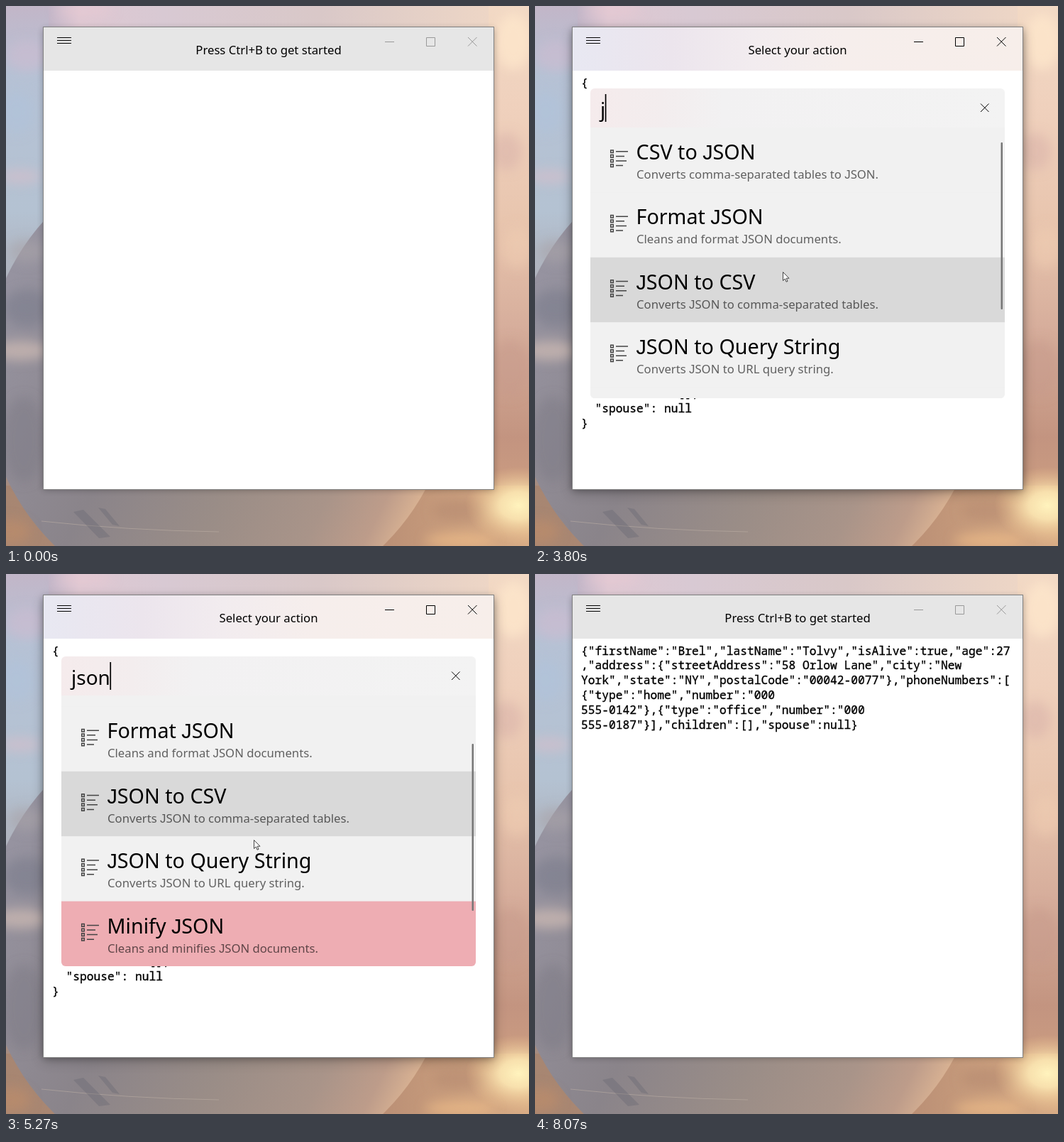
Recreate the animation shown at these times as an HTML page. Size 737x760 px, loop 8.19 s.

```html
<!DOCTYPE html>
<html lang="en">
<head>
<meta charset="utf-8">
<title>Editor command palette</title>
<style>
  html, body { margin: 0; width: 100%; height: 100%; overflow: hidden; }
  svg { display: block; width: 737px; height: 760px; }
  text { font-family: "Noto Sans", sans-serif; white-space: pre; }
  .ui { font-size: 16.7px; }
  .desc { font-size: 16.7px; fill: rgba(0, 0, 0, .6); }
  .name { font-size: 28.7px; }
  .query { font-size: 28px; }
  .code { font-family: "Noto Sans Mono", monospace; font-size: 16.25px; stroke: #000; stroke-width: .35px; }
  .cap { font-family: "Liberation Sans", sans-serif; }
  .line { fill: none; stroke: #000; stroke-width: 1; }
</style>
</head>
<body>
<svg viewBox="0 0 737 760" xmlns="http://www.w3.org/2000/svg">
  <defs>
    <linearGradient id="top">
      <stop offset=".08" stop-color="#c2b6c8"/><stop offset=".14" stop-color="#dec8d2"/>
      <stop offset=".3" stop-color="#d8c9d3"/><stop offset=".6" stop-color="#d9c8c8"/>
      <stop offset="1" stop-color="#f2d9c5"/>
    </linearGradient>
    <linearGradient id="left" x2="0" y2="1">
      <stop offset="0" stop-color="#c2b6c8"/><stop offset=".13" stop-color="#b6c2d5"/>
      <stop offset=".38" stop-color="#b4c2d2"/><stop offset=".7" stop-color="#a79a9c"/>
      <stop offset="1" stop-color="#a78672"/>
    </linearGradient>
    <linearGradient id="right" x2="0" y2="1">
      <stop offset="0" stop-color="#f2d9c5"/><stop offset=".2" stop-color="#efd0bc"/>
      <stop offset=".4" stop-color="#e8c5ae"/><stop offset=".6" stop-color="#d6ad9b"/>
      <stop offset=".8" stop-color="#c39480"/><stop offset="1" stop-color="#d3a581"/>
    </linearGradient>
    <linearGradient id="bottom">
      <stop offset="0" stop-color="#a78672"/><stop offset=".7" stop-color="#b88d74"/>
      <stop offset="1" stop-color="#d9ad86"/>
    </linearGradient>
    <linearGradient id="planet" gradientUnits="userSpaceOnUse" x1="0" y1="400" x2="600" y2="700">
      <stop offset="0" stop-color="#9693a0"/><stop offset=".35" stop-color="#8a848a"/>
      <stop offset=".6" stop-color="#9a8d87"/><stop offset=".8" stop-color="#a99489"/>
      <stop offset=".91" stop-color="#bd9c8a"/><stop offset=".98" stop-color="#dab393"/>
    </linearGradient>
    <radialGradient id="glow">
      <stop offset="0" stop-color="#fff3bd"/><stop offset=".35" stop-color="#fbe6b2" stop-opacity=".9"/>
      <stop offset="1" stop-color="#f0c490" stop-opacity="0"/>
    </radialGradient>
    <linearGradient id="acrylic">
      <stop offset="0" stop-color="#e8e8f2"/><stop offset=".22" stop-color="#ece5ed"/>
      <stop offset=".4" stop-color="#f2ecef"/><stop offset=".6" stop-color="#f6eeec"/>
      <stop offset="1" stop-color="#f7eeea"/>
    </linearGradient>
    <linearGradient id="field" gradientUnits="userSpaceOnUse" x1="78" x2="662">
      <stop offset="0" stop-color="#f5ebec"/><stop offset=".17" stop-color="#f3edee"/>
      <stop offset=".32" stop-color="#f2f1f2"/><stop offset="1" stop-color="#f3f3f3"/>
    </linearGradient>
    <filter id="soft" x="-50%" y="-50%" width="200%" height="200%"><feGaussianBlur stdDeviation="8"/></filter>
    <filter id="shade" x="-10%" y="-10%" width="120%" height="120%"><feGaussianBlur stdDeviation="5"/></filter>
    <filter id="deep" x="-10%" y="-10%" width="120%" height="120%"><feGaussianBlur stdDeviation="9"/></filter>
    <clipPath id="panelClip"><rect x="78" y="116" width="584" height="436" rx="6"/></clipPath>
    <clipPath id="listClip"><rect x="78" y="171" width="584" height="381"/></clipPath>
  </defs>

  <rect width="737" height="760" fill="url(#top)"/>
  <rect width="60" height="760" fill="url(#left)"/>
  <rect x="680" width="57" height="760" fill="url(#right)"/>
  <rect y="675" width="737" height="85" fill="url(#bottom)"/>
  <circle cx="300" cy="523" r="331" fill="url(#planet)"/>
  <g id="clouds" filter="url(#soft)"></g>
  <ellipse cx="722" cy="703" rx="75" ry="55" fill="url(#glow)"/>
  <path d="M50 725Q170 738 300 740" fill="none" stroke="#c3b5aa" opacity=".5"/>
  <path d="M95 712l14-3 38 38-16 2zM130 706l10 2 20 24-10-2z" fill="#65646f" opacity=".35"/>

  <rect id="idleShadow" x="52" y="32" width="636" height="649" filter="url(#shade)" opacity=".28"/>
  <rect id="activeShadow" x="52" y="36" width="636" height="649" filter="url(#deep)" opacity=".25"/>
  <rect x="52" y="29" width="636" height="652" fill="#808080"/>
  <rect x="53" y="30" width="634" height="650" fill="#fff"/>
  <rect x="53" y="30" width="634" height="61" fill="#e6e6e6"/>
  <rect id="titleTint" x="53" y="30" width="634" height="61" fill="url(#acrylic)"/>
  <path class="line" d="M72 44.5h20M72 48.5h20M72 52.5h20"/>
  <path id="controls" class="line" d="M534 50.5h13M592.5 44.5h12v12h-12zM651 44l12.5 12.5M663.5 44L651 56.5"/>
  <text id="title" class="ui" x="370" y="68" text-anchor="middle"></text>

  <g id="pretty"></g>
  <g id="compact"></g>
  <rect id="caret" width="1.7" height="20"/>

  <g id="panel">
    <rect x="78" y="116" width="584" height="55" rx="6" fill="url(#field)"/>
    <g id="results" clip-path="url(#panelClip)">
      <rect x="78" y="160" width="584" height="11" fill="url(#field)"/>
      <g clip-path="url(#listClip)">
        <rect x="78" y="171" width="584" height="381" fill="#f1f1f1"/>
        <g id="items"></g>
        <rect id="thumb" x="656.5" width="2.5" height="235" rx="1" fill="#777"/>
      </g>
      <path class="line" d="M628 137.5l11.5 11.5M639.5 137.5L628 149"/>
    </g>
    <text id="hint" class="query" x="91" y="157" fill="#918c8d">Start typing...</text>
    <text id="query" class="query" x="92" y="156"></text>
    <rect id="queryCaret" y="124" width="1.7" height="39"/>
  </g>

  <path id="arrow" d="M.5.5v12l2.8-2.6 1.8 4.3 1.9-.8-1.8-4.2h3.8z" fill="#fff" stroke="#333" stroke-width=".9"/>
  <path id="beam" class="line" d="M-3.5-6.5h3l.5.5.5-.5h3M0-6v12.5M-3.5 7h3l.5-.5.5.5h3"/>
</svg>

<script>
const LOOP = 8190, STEP = 200 / 3, ROW = 91.4, LINE = 20.83, CHAR = 9.75;
const COLUMNS = 62, TEXT_X = 65, TEXT_Y = 113.5;
const $ = id => document.getElementById(id);

function add(parent, tag, attrs, text) {
  const el = document.createElementNS("http://www.w3.org/2000/svg", tag);
  for (const key in attrs) el.setAttribute(key, attrs[key]);
  if (text) el.textContent = text;
  return parent.appendChild(el);
}
const set = (id, attrs) => { for (const key in attrs) $(id).setAttribute(key, attrs[key]); };
const show = (id, on) => { $(id).style.display = on ? "" : "none"; };
const between = (t, from, to) => t >= from && t < to;

// Value of the last entry [time, value] that has begun.
const at = (table, t) => table.reduce((value, [start, next]) => t >= start ? next : value, table[0][1]);

// Sky and surface patches: x, y, rx, ry, colour, opacity
[
  [110, 6, 40, 10, "#eccad4", .5],
  [30, 70, 30, 22, "#cdbdd0", .6],
  [15, 150, 25, 30, "#b0c4db", .6],
  [20, 240, 30, 10, "#d3bfcb", .7],
  [30, 345, 26, 16, "#a9a3a8", .6],
  [30, 425, 34, 26, "#7b7d8d", .6],
  [20, 485, 40, 14, "#c9b7b2", .8],
  [25, 610, 30, 60, "#7f7b86", .5],
  [5, 740, 30, 18, "#c08e6c", .6],
  [715, 50, 26, 40, "#ffe8cc", .7],
  [705, 205, 22, 26, "#d7b0a7", .5],
  [720, 340, 22, 30, "#f2cfb4", .5],
  [710, 510, 30, 40, "#c59a8c", .5],
  [640, 710, 40, 16, "#b68a70", .6],
  [640, 752, 50, 10, "#eebd88", .7]
].forEach(([cx, cy, rx, ry, fill, opacity]) => add($("clouds"), "ellipse", { cx, cy, rx, ry, fill, opacity }));

const person = {
  firstName: "Brel", lastName: "Tolvy", isAlive: true, age: 27,
  address: { streetAddress: "58 Orlow Lane", city: "New York", state: "NY", postalCode: "00042-0077" },
  phoneNumbers: [
    { type: "home", number: "000 555-0142" },
    { type: "office", number: "000 555-0187" }
  ],
  children: [], spouse: null
};

function wrap(text) {
  const lines = [];
  while (text) {
    const space = text.length > COLUMNS ? text.slice(0, COLUMNS).lastIndexOf(" ") : -1;
    const end = space < 0 ? COLUMNS : space + 1;
    lines.push(text.slice(0, end));
    text = text.slice(end);
  }
  return lines;
}

function typeset(parent, lines) {
  lines.forEach((line, i) => add(parent, "text", { class: "code", x: TEXT_X, y: TEXT_Y + i * LINE }, line));
}

function underline(line, row) {
  const word = line.match(/[a-z]+[A-Z]\w+/);
  if (!word) return;
  let d = `M${TEXT_X + word.index * CHAR} ${TEXT_Y + row * LINE + 4.5}`;
  for (let x = 0, up = true; x < word[0].length * CHAR - 3; x += 4, up = !up) d += `l4 ${up ? -3.5 : 3.5}`;
  add($("pretty"), "path", { d, fill: "none", stroke: "#e8262c", "stroke-width": 1.8, "stroke-linejoin": "round" });
}

const prettyLines = JSON.stringify(person, null, 2).split("\n");
typeset($("pretty"), prettyLines);
prettyLines.forEach(underline);
typeset($("compact"), wrap(JSON.stringify(person)));

// Capital J is set in a face where it rests on the baseline.
function label(parent, attrs, text) {
  const el = add(parent, "text", attrs);
  text.split(/(J)/).forEach(part => add(el, "tspan", part === "J" ? { class: "cap" } : {}, part));
}

const rows = [
  ["CSV to JSON", "Converts comma-separated tables to JSON."],
  ["Format JSON", "Cleans and format JSON documents."],
  ["JSON to CSV", "Converts JSON to comma-separated tables."],
  ["JSON to Query String", "Converts JSON to URL query string."],
  ["Minify JSON", "Cleans and minifies JSON documents."]
].map(([name, desc], i) => {
  const g = add($("items"), "g", { transform: `translate(78 ${171 + i * ROW})` });
  const back = add(g, "rect", { width: 584, height: ROW });
  let icon = "";
  [17, 12, 15, 10].forEach((length, k) => {
    const y = 32 + k * 6.6;
    icon += `M28.7 ${y}h3.6v3.6h-3.6zM36 ${y + 1.8}h${length}`;
  });
  add(g, "path", { d: icon, fill: "none", stroke: "#444", "stroke-width": 1.5 });
  label(g, { class: "name", x: 64.5, y: 45 }, name);
  label(g, { class: "desc", x: 65, y: 72 }, desc);
  return back;
});

const tint = [[0, 0], [930, .25], [1000, .5], [1070, .75], [1130, 1], [8000, .4], [8070, 0]];
const typed = [[0, ""], [3800, "j"], [3930, "js"], [4000, "jso"], [4130, "json"]];
const selection = [[0, -1], [4600, 0], [4670, 1], [4730, 2], [4930, 3], [5270, 4]];
const hovered = [[0, 2], [5600, 3]];
const carets = [
  [0, null], [930, [65.3, 98]], [1930, [75, 578]], [3070, null], [6070, [65.3, 98]], [7400, null]
];

function pointer(t) {
  if (t < 130 || t >= 7600) return null;
  if (t < 930) {
    const p = Math.min(1, (Math.floor((t - 130) / STEP) + 1) / 12);
    const rest = (1 - p) ** 2;
    return [350.5 - 50 * rest, 377 + 390 * rest];
  }
  if (t < 1330) return [350.5, 377];
  if (t < 3070) return [350.5, 376];
  if (t < 7330) return [350.5, 375];
  const p = (Math.floor((t - 7330) / STEP) + 1) / 5;
  return [350.5 - 40 * p, 375 + 400 * p * p];
}

function render(t) {
  const active = between(t, 930, 8000), open = between(t, 3070, 6000);
  set("titleTint", { opacity: at(tint, t) });
  set("controls", { style: `stroke:${active ? "#000" : "#999"}` });
  show("activeShadow", active);
  $("title").textContent = open ? "Select your action" : "Press Ctrl+B to get started";

  show("pretty", between(t, 1930, 6000));
  show("compact", t >= 6000);
  const caret = at(carets, t);
  show("caret", caret);
  if (caret) set("caret", { x: caret[0], y: caret[1] });

  show("panel", open);
  if (open) {
    const query = at(typed, t), scroll = t < 5270 ? 0 : 1;
    const selected = at(selection, t), hover = at(hovered, t);
    $("query").textContent = query;
    show("hint", !query);
    show("results", query);
    set("queryCaret", { x: query ? 91.5 + $("query").getComputedTextLength() : 90.5 });
    show("queryCaret", t < 5670);
    set("items", { transform: `translate(0 ${-76 * scroll})` });
    set("thumb", { y: 192 + 47 * scroll });
    rows.forEach((row, i) => row.setAttribute("fill",
      i === selected ? (i === hover ? "#e79ba3" : "#eeadb3") : i === hover ? "#d9d9d9" : "#f1f1f1"));
  }

  const spot = pointer(t);
  const arrow = spot && (between(t, 3070, 6070) || spot[1] > 680);
  show("arrow", arrow);
  show("beam", spot && !arrow);
  if (spot) {
    set("arrow", { transform: `translate(${spot[0] - 1.5} ${spot[1] - 1})` });
    set("beam", { transform: `translate(${spot[0]} ${spot[1]})` });
  }
}

function frame() {
  render(performance.now() % LOOP);
  requestAnimationFrame(frame);
}
frame();
</script>
</body>
</html>
```
